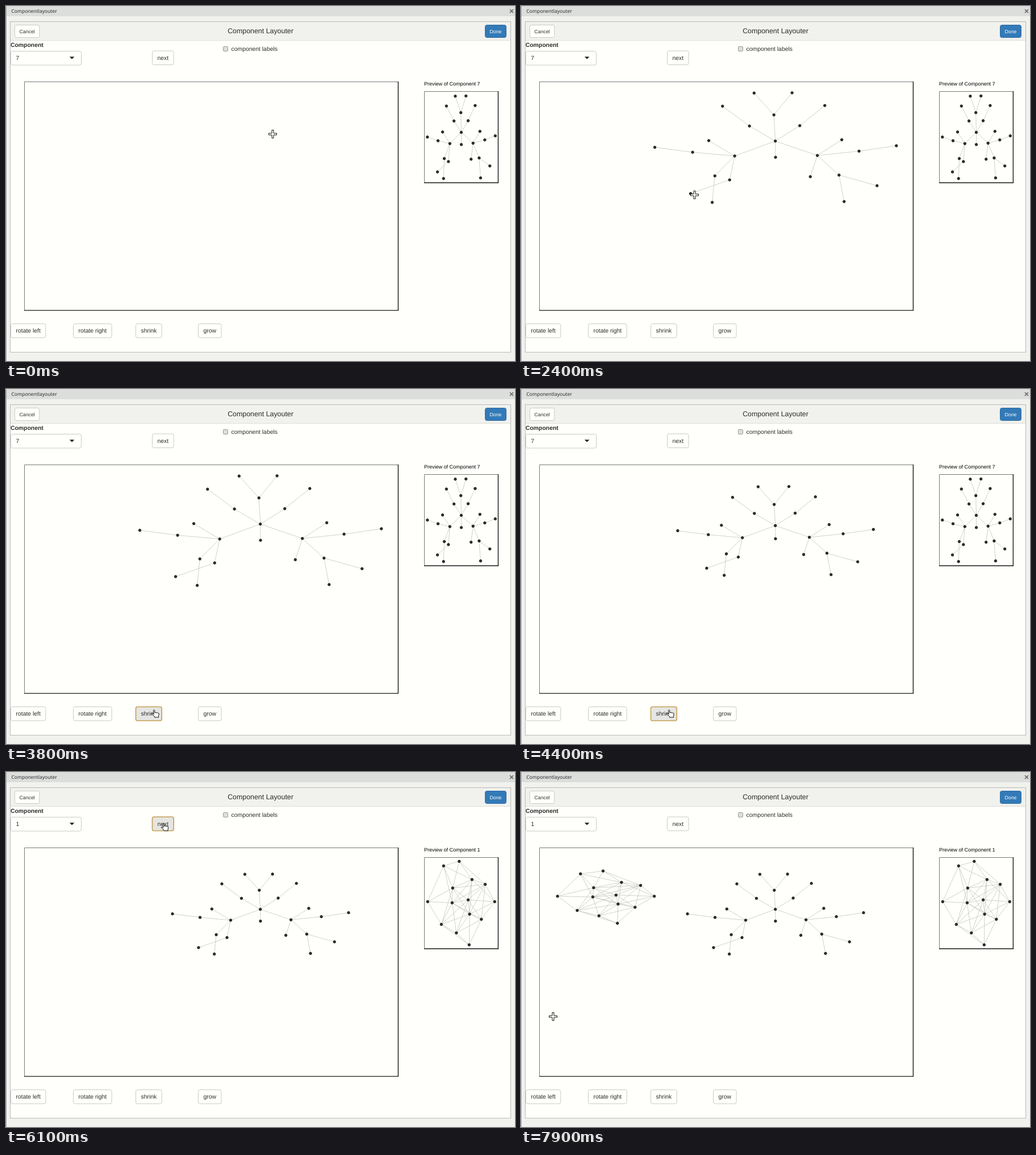
Animation of 896x625 px, one loop 8 s. Source, as an HTML page:

```html
<!DOCTYPE html>
<html lang="en">
<head>
<meta charset="utf-8">
<title>Component Layouter</title>
<style>
html, body { margin: 0; width: 100%; height: 100%; overflow: hidden; background: #f1f2ee; }
svg { display: block; }
text { font-family: "Liberation Sans", Arial, sans-serif; font-size: 10.4px; fill: #2c2c2c; text-rendering: geometricPrecision; }
.title { font-size: 12.4px; text-anchor: middle; }
.bar { font-family: "Noto Sans", sans-serif; font-size: 8.5px; }
#caption { font-size: 9px; fill: #000; }
.field { fill: #fffffb; stroke: #c9c9c6; }
.small text { font-size: 8.75px; }
.btn rect { fill: #fffffb; stroke: #c9c9c6; }
.btn.done rect { fill: #337ab7; stroke: #2e6da4; }
.btn.done text { fill: #fff; }
.btn.hover rect { fill: #e5e5e2; stroke: #adadaa; }
.btn.focus rect { fill: #e5e5e2; stroke: #c5a055; stroke-width: 1.6; }
.edges { fill: none; stroke: #c3c3c0; stroke-width: .8; }
.nodes circle { fill: #333; stroke: #0c0c0c; stroke-width: .9; }
#pointer { fill: #fff; stroke: #111; stroke-linejoin: round; }
.soft { fill: none; stroke: #777; }
.hard { fill: none; stroke: #161616; stroke-width: 1.4; }
</style>
</head>
<body>
<svg width="896" height="625" viewBox="0 0 896 625">
  <rect width="896" height="625" fill="#f1f2ee"/>
  <rect width="896" height="18" fill="#dcdedc"/>
  <path d="M.5 0V625" stroke="#a9abaa"/>
  <text class="bar" x="9.5" y="12">Componentlayouter</text>
  <path d="M887 6l6 6m0-6l-6 6" stroke="#666" stroke-width="1.7"/>
  <rect x="7.5" y="27.5" width="881" height="582" fill="#fffffb" stroke="#b9bbb8"/>
  <rect x="8" y="28" width="880" height="32" fill="#f1f1ed"/>
  <path d="M8 60.5H888" stroke="#dededb"/>
  <text class="title" x="448" y="47.7">Component Layouter</text>
  <text x="8" y="72" font-weight="bold">Component</text>
  <rect class="field" x="8.5" y="79.5" width="124" height="24.5" rx="3"/>
  <text id="choice" x="17.5" y="95.2"></text>
  <path d="M111.8 89.2h8.6l-4.3 4.4z" fill="#222"/>
  <rect x="382.5" y="71.5" width="8" height="8" rx="1.5" fill="#dededb" stroke="#999"/>
  <text x="396.5" y="79.3">component labels</text>
  <g id="buttons"></g>
  <path class="soft" d="M32.5 536V133.5H690"/>
  <path class="hard" d="M690.4 133V535.9H32"/>
  <text id="caption" x="736" y="140"></text>
  <path class="soft" d="M736.5 311V150.5H866"/>
  <path class="hard" d="M866.4 150V311.3H736"/>
  <g id="graphs"></g>
  <path id="pointer"/>
</svg>
<script>
const LOOP = 8000, STEP = 100;
const $ = id => document.getElementById(id);

function add(parent, tag, attrs, text) {
  const el = document.createElementNS('http://www.w3.org/2000/svg', tag);
  for (const key in attrs) el.setAttribute(key, attrs[key]);
  if (text) el.textContent = text;
  return parent.appendChild(el);
}

// Buttons take their width from the label.
function makeButton(label, x, y, extra = '') {
  const base = 'btn ' + extra, pad = extra ? 8 : 9, h = extra ? 22 : 24.5;
  const el = add($('buttons'), 'g', { class: base });
  const box = add(el, 'rect', { x, y, height: h, rx: 3 });
  const text = add(el, 'text', { x: x + pad, y: y + h / 2 + (extra ? 3.3 : 3.7) }, label);
  const w = text.getComputedTextLength() + 2 * pad;
  box.setAttribute('width', w);
  return { label, x, y, w, h, base, el };
}

const buttons = [
  makeButton('Cancel', 15.5, 33.5, 'small'),
  makeButton('Done', 843.5, 33.5, 'small done'),
  makeButton('next', 257.5, 79),
  ...['rotate left', 'rotate right', 'shrink', 'grow'].map((label, i) => makeButton(label, 8.5 + 110 * i, 559.5))
];

// The tree is a left half plus its mirror image, turned slightly about the root.
function treePaths() {
  const c = Math.cos(Math.PI / 90), s = Math.sin(Math.PI / 90);
  const twin = ([x, y]) => [y * s - x * c, y * c + x * s];
  const root = [0, 0], stem = [-0.7, -34.7], hub = [-20.1, 19.8], knee = [-29.9, 46.2];
  const half = [
    [root, [-12.8, -20], [-26.1, -46.3]],
    [root, hub, [-32.9, -0.6]],
    [hub, [-40.9, 14.8], [-59.6, 8.3]],
    [hub, knee, [-31.2, 81.4]]
  ];
  return [
    ...half, ...half.map(path => path.map(twin)),
    [root, stem, [-10.5, -63.7]],
    [stem, twin([-10.5, -63.7])],
    [root, [0.1, 21.5]],
    [hub, [-22.6, 51.5], [-41.9, 69.7]],
    [twin(hub), [17.3, 47.3]],
    [twin(knee), [50.3, 59.2]]
  ];
}

// The mesh joins every two points that lie close together.
function meshPaths() {
  const points = [
    [-3.5, -73.5], [-31, -65.5], [19, -41.5], [42.3, -33], [-15, -26.5], [12.3, -5.7], [-59, -2.5],
    [59, -2.5], [-16, -0.5], [14.8, 19.5], [35.5, 28.5], [-35, 37.5], [-8.5, 52.5], [14, 73.5]
  ];
  return points.flatMap((p, i) => points.slice(i + 1)
    .filter(q => Math.hypot(p[0] - q[0], p[1] - q[1]) < 69.5)
    .map(q => [p, q]));
}

function makeGraph(paths) {
  const nodes = [...new Map(paths.flat().map(p => [String(p), p])).values()];
  const root = add($('graphs'), 'g', {});
  const lines = add(root, 'path', { class: 'edges' });
  const dots = add(root, 'g', { class: 'nodes' });
  const circles = nodes.map(() => add(dots, 'circle', { r: 2.2 }));
  return (visible, cx, cy, sx = 1, sy = 1) => {
    root.style.display = visible ? '' : 'none';
    const place = ([x, y]) => [cx + x * sx, cy + y * sy];
    lines.setAttribute('d', paths.map(path => 'M' + path.map(place).join('L')).join(''));
    nodes.map(place).forEach(([x, y], i) => {
      circles[i].setAttribute('cx', x);
      circles[i].setAttribute('cy', y);
    });
  };
}

const mainTree = makeGraph(treePaths()), thumbTree = makeGraph(treePaths());
const mainMesh = makeGraph(meshPaths()), thumbMesh = makeGraph(meshPaths());

const shapes = {
  cross: 'M-1.5-7h3v5.5h5.5v3h-5.5v5.5h-3v-5.5h-5.5v-3h5.5z',
  arrow: 'M0 0V11.7l2.7-2.4 1.9 4.4 2-.9-1.9-4.2h3.5z',
  hand: 'M-1 1q1-1.6 2 0l.6 4.5 1.8-.6 1 .7 1.5-.3 .9 .8q2-.4 2 1.5l-.8 3.4v2.5H1.2l-1-2.4-3.7-2.8q-.9-1.7 .8-1.5L-.2 8z'
};

// Pointer moves: start time, end time, destination; it rests in between.
const moves = [
  [100, 600, 528, 250], [600, 700, 512.5, 248.5],
  [1600, 2200, 254, 99], [2200, 2600, 357, 566], [2700, 3000, 265.5, 565.5], [3300, 3400, 260.5, 564.5],
  [5100, 5300, 218, 310], [5300, 5400, 256, 119], [5400, 5700, 277, 90],
  [6100, 6900, 99.5, 215.5], [7500, 7900, 56.5, 430.5]
];

function pointerAt(t) {
  let x = 469.5, y = 225.5;
  for (const [from, to, tx, ty] of moves) {
    const k = Math.min(1, Math.max(0, (t - from) / (to - from)));
    const ease = k * k * (3 - 2 * k);
    x += (tx - x) * ease;
    y += (ty - y) * ease;
  }
  return [x, y];
}

const within = (x, y, b) => x >= b.x && x <= b.x + b.w && y >= b.y && y <= b.y + b.h;
const plot = { x: 32, y: 133, w: 658, h: 403 };
const shrinkTimes = [3900, 4400, 4900];

function draw(t) {
  const [x, y] = pointerAt(t);
  const over = buttons.find(b => within(x, y, b));
  const focus = t >= 3800 && t < 5900 ? 'shrink' : t >= 5900 && t < 7300 ? 'next' : '';
  for (const b of buttons) {
    b.el.setAttribute('class', b.base + (b === over ? ' hover' : '') + (b.label === focus ? ' focus' : ''));
  }
  const kind = over ? 'hand' : within(x, y, plot) ? 'cross' : 'arrow';
  $('pointer').setAttribute('transform', `translate(${x} ${y})`);
  $('pointer').setAttribute('d', shapes[kind]);

  const switched = t >= 6000;
  const number = switched ? '1' : '7';
  $('choice').textContent = number;
  $('caption').textContent = 'Preview of Component ' + number;

  const scale = 0.9 ** shrinkTimes.filter(s => t >= s).length;
  mainTree(t >= 1500, 447.7, 252.3 - 14.5 * scale, 3.56 * scale, 1.327 * scale);
  mainMesh(t >= 7500, 149.5, 220.3, 1.445, 0.626);
  thumbTree(!switched, 801.4, 222.4);
  thumbMesh(switched, 801.3, 230.8);
}

let last = -1;
function tick() {
  const t = Math.floor(performance.now() % LOOP / STEP) * STEP;
  if (t !== last) draw(last = t);
  requestAnimationFrame(tick);
}
tick();
</script>
</body>
</html>
```
